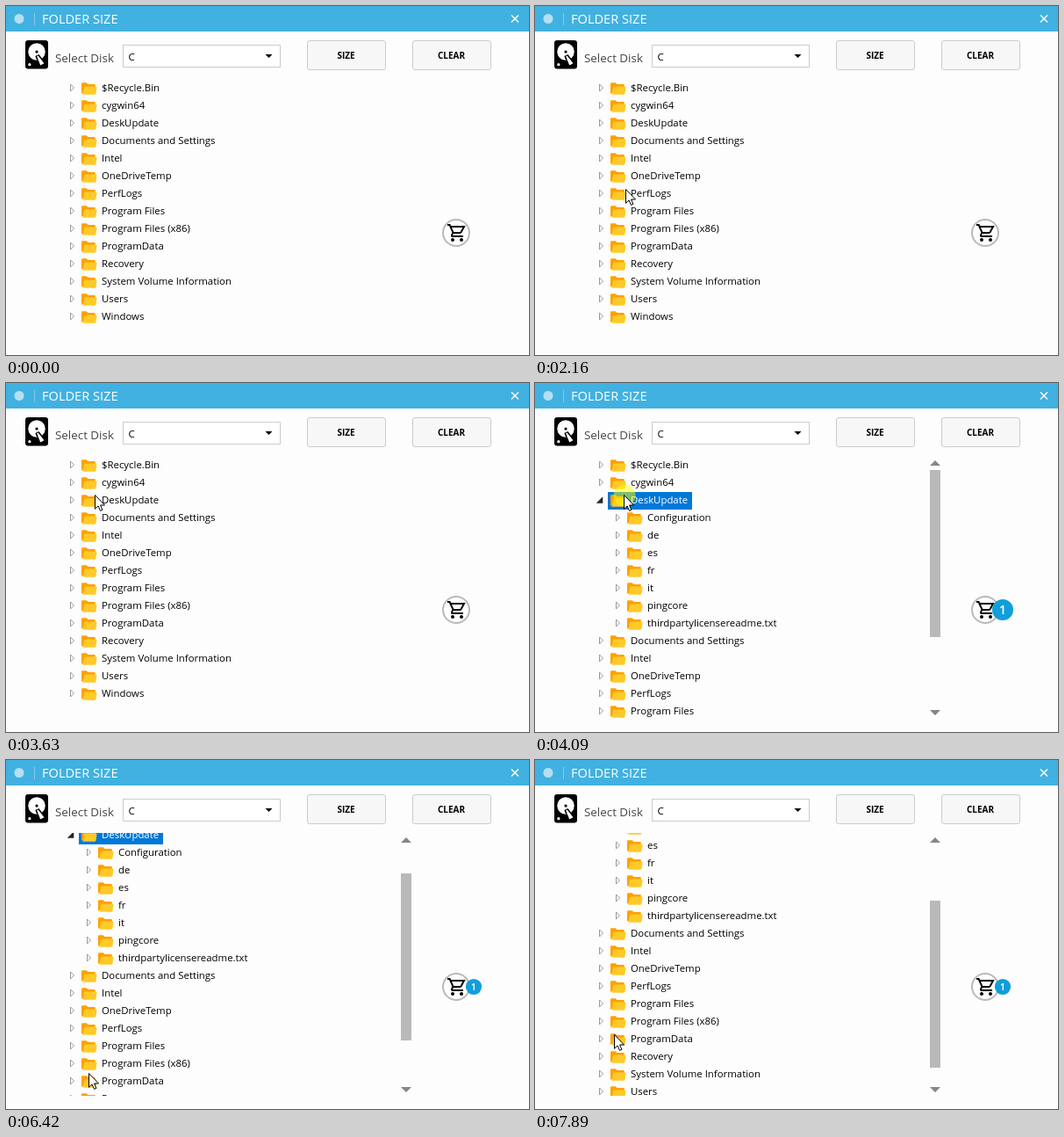
Animation, 596 px wide and 397 px high, one loop 8 s. Source, as an HTML page:

```html
<!DOCTYPE html>
<html lang="en">
<head>
<meta charset="utf-8">
<title>Folder size</title>
<style>
html, body { margin: 0; width: 100%; height: 100%; overflow: hidden; background: #fdfdfd; }
svg { display: block; width: 100vw; height: 100vh; }
text { font-family: "Open Sans", "Noto Sans", sans-serif; white-space: pre; }
.row text { font-size: 11.4px; fill: #000; }
.row.picked text { fill: #fff; }
.button { fill: #f7f7f7; stroke: #ccc; }
.caption { font-size: 10px; font-weight: 700; text-anchor: middle; }
</style>
</head>
<body>
<svg id="stage" viewBox="0 0 596 397">
  <defs>
    <clipPath id="view"><rect x="70" y="83" width="378" height="299"/></clipPath>
    <g id="folder">
      <path fill="#ffa000" d="M1.7 4.4Q1.7 3.3 2.8 3.3H7.5L9.2 5H16.4Q17.5 5 17.5 6.1V15H3L1.7 16Z"/>
      <path fill="#ffca28" d="M6 7.5H18Q19.4 7.5 19.2 8.9L18.2 15.4Q18 16.7 16.6 16.7H3.2L4.7 8.8Q5 7.5 6 7.5Z"/>
    </g>
    <path id="closed" d="M.5 -4V4L4.5 0Z" fill="#fff" stroke="#989898"/>
    <path id="open" d="M4 -3.2V3.5H-2.7Z" fill="#262626" stroke="#262626" stroke-width=".6"/>
  </defs>

  <rect width="596" height="397" fill="#fdfdfd"/>
  <rect width="596" height="29" fill="#41b1e1"/>
  <circle cx="15" cy="14.5" r="5.5" fill="#b5dff3"/>
  <path d="M32.5 8V22" stroke="#83cbeb"/>
  <text x="41" y="20" font-size="14.6" fill="#fff">FOLDER SIZE</text>
  <path d="M576 10.5L584 18.5M584 10.5L576 18.5" stroke="#fff" stroke-width="1.5"/>

  <g transform="translate(15.5 35.75) scale(1.625)" fill="#fff">
    <rect x="4" y="2" width="16" height="20" rx="2" fill="#000"/>
    <circle cx="12" cy="10" r="6"/>
    <circle cx="12" cy="10" r="1" fill="#000"/>
    <path d="M12.1 16L11 13L13.5 11.8L16 15Z" fill="#000"/>
    <path d="M12.1 13.3L14.6 19.6L17.2 18.1L13 12.8Z"/>
    <circle cx="7" cy="19" r="1"/>
  </g>
  <text x="56" y="64" font-size="13.4" fill="#444">Select Disk</text>
  <rect x="133.5" y="44.5" width="179" height="25" fill="#fff" stroke="#ccc"/>
  <text x="139.5" y="62" font-size="11.6">C</text>
  <path d="M295.5 55H303.5L299.5 59Z"/>
  <rect class="button" x="343.5" y="39.5" width="89" height="33" rx="2.5"/>
  <text class="caption" x="387.5" y="60">SIZE</text>
  <rect class="button" x="463.5" y="39.5" width="89" height="33" rx="2.5"/>
  <text class="caption" x="507.5" y="60">CLEAR</text>

  <g clip-path="url(#view)"><g id="tree"></g></g>
  <g id="bar">
    <path d="M450 94H462L456 88ZM450 372H462L456 378Z" fill="#868686"/>
    <rect id="thumb" x="450" width="12" height="190" fill="#b9b9b9"/>
  </g>

  <circle cx="513" cy="258" r="15" fill="#fff" stroke="#b9b9b9" stroke-width="2"/>
  <g transform="translate(502 246)">
    <path d="M1 3H3.6L7.6 12H15.6Q16.2 12 16.5 11.4L20 5H4.6M7.3 12L6.2 14.4Q5.5 16 7.2 16H19" fill="none" stroke="#000" stroke-width="2"/>
    <circle cx="7" cy="20" r="2"/>
    <circle cx="17" cy="20" r="2"/>
  </g>
  <g id="badge">
    <circle r="9.1" fill="#119eda"/>
    <text y="3.9" font-size="11" font-weight="600" fill="#fff" text-anchor="middle">1</text>
  </g>

  <circle id="halo" r="12.5" fill="#ff0" fill-opacity=".5"/>
  <path id="cursor" d="M.5 .5V16.3L4.1 12.9L6.5 18.4L8.9 17.4L6.6 12H11.5Z" fill="#fff" stroke="#000"/>
</svg>
<script>
const LOOP = 8000, TICK = 78, ROW = 20, TOP = 93;
const SELECT = 3860, EXPAND = 4010, HALO_END = 4380, POP = 250;
const WHEEL = [6420, 6650], NOTCH = 48;
const TRACK = 266, CONTENT = 420 - 2;
const $ = id => document.getElementById(id);

const folders = ["$Recycle.Bin", "cygwin64", "DeskUpdate", "Documents and Settings", "Intel",
  "OneDriveTemp", "PerfLogs", "Program Files", "Program Files (x86)", "ProgramData", "Recovery",
  "System Volume Information", "Users", "Windows"];
const children = ["Configuration", "de", "es", "fr", "it", "pingcore", "thirdpartylicensereadme.txt"];
const PICKED = 2;

// Each pointer move starts where the last one ended; bow bends it sideways.
const entry = { x: 533, y: 400 };
const moves = [
  { start: 450, steps: 10, x: 92, y: 122, bow: -85 },
  { start: 1310, steps: 2, x: 90, y: 129, bow: 0 },
  { start: 1850, steps: 9, x: 104, y: 254, bow: 4 },
  { start: 2620, steps: 11, x: 102, y: 136, bow: 3 },
  { start: 3480, steps: 3, x: 101, y: 127, bow: 0 },
  { start: 4630, steps: 11, x: 104, y: 341, bow: -10 },
  { start: 5470, steps: 4, x: 91, y: 339, bow: 4 },
  { start: 5960, steps: 4, x: 94, y: 356, bow: 0 },
  { start: 7110, steps: 4, x: 94, y: 342, bow: 0 },
  { start: 7570, steps: 5, x: 90, y: 312, bow: 0 }
];

function addRow(name, child) {
  const row = document.createElementNS("http://www.w3.org/2000/svg", "g");
  const dx = child ? 19 : 0;
  row.setAttribute("class", "row");
  row.innerHTML =
    `<rect x="83" y="-9" width="96" height="${ROW}" fill="#0078d7" visibility="hidden"/>
     <use href="#closed" x="${73 + dx}"/>
     <use href="#folder" x="${84.3 + dx}" y="-9"/>
     <text x="${109 + dx}" y="4">${name}</text>`;
  $("tree").append(row);
  return row;
}
const rows = folders.map(name => addRow(name, false));
const subrows = children.map(name => addRow(name, true));
const picked = rows[PICKED];

const place = (el, x, y) => el.setAttribute("transform", `translate(${x} ${y})`);
const show = (el, on) => el.setAttribute("visibility", on ? "visible" : "hidden");
const clamp = u => Math.min(Math.max(u, 0), 1);
const easeOut = u => 1 - (1 - u) ** 1.25;

function pointer(t) {
  const i = moves.findLastIndex(m => t >= m.start);
  if (i < 0) return null;
  const to = moves[i], from = moves[i - 1] || entry;
  const step = Math.floor((t - to.start) / TICK + 0.1) + 1;
  const u = easeOut(clamp(step / to.steps));
  const dx = to.x - from.x, dy = to.y - from.y;
  const side = to.bow * 4 * u * (1 - u) / Math.hypot(dx, dy);
  return {
    x: Math.round(from.x + dx * u + dy * side),
    y: Math.round(from.y + dy * u - dx * side)
  };
}

function draw(t) {
  const selected = t >= SELECT, expanded = t >= EXPAND;
  const scroll = NOTCH * WHEEL.filter(w => t >= w).length;

  rows.forEach((row, i) => {
    const shift = expanded && i > PICKED ? children.length : 0;
    place(row, 0, TOP + ROW * (i + shift));
  });
  subrows.forEach((row, i) => {
    place(row, 0, TOP + ROW * (PICKED + 1 + i));
    row.style.display = expanded ? "" : "none";
  });
  picked.classList.toggle("picked", selected);
  show(picked.querySelector("rect"), selected);
  picked.querySelector("use").setAttribute("href", expanded ? "#open" : "#closed");
  place($("tree"), 0, -scroll);

  show($("bar"), expanded);
  $("thumb").setAttribute("y", Math.floor(99 + scroll * TRACK / CONTENT));

  const pop = 1 + 0.38 * Math.sin(Math.PI * clamp((t - EXPAND) / POP));
  $("badge").setAttribute("transform", `translate(533 258) scale(${pop})`);
  show($("badge"), expanded);

  const tip = pointer(t);
  show($("cursor"), tip);
  show($("halo"), t >= SELECT && t < HALO_END);
  if (tip) {
    place($("cursor"), tip.x, tip.y);
    place($("halo"), tip.x + 1, tip.y + 1);
  }
}

const begin = performance.now();
function tick(now) {
  draw(Math.max(now - begin, 0) % LOOP);
  requestAnimationFrame(tick);
}
draw(0);
requestAnimationFrame(tick);
</script>
</body>
</html>
```
